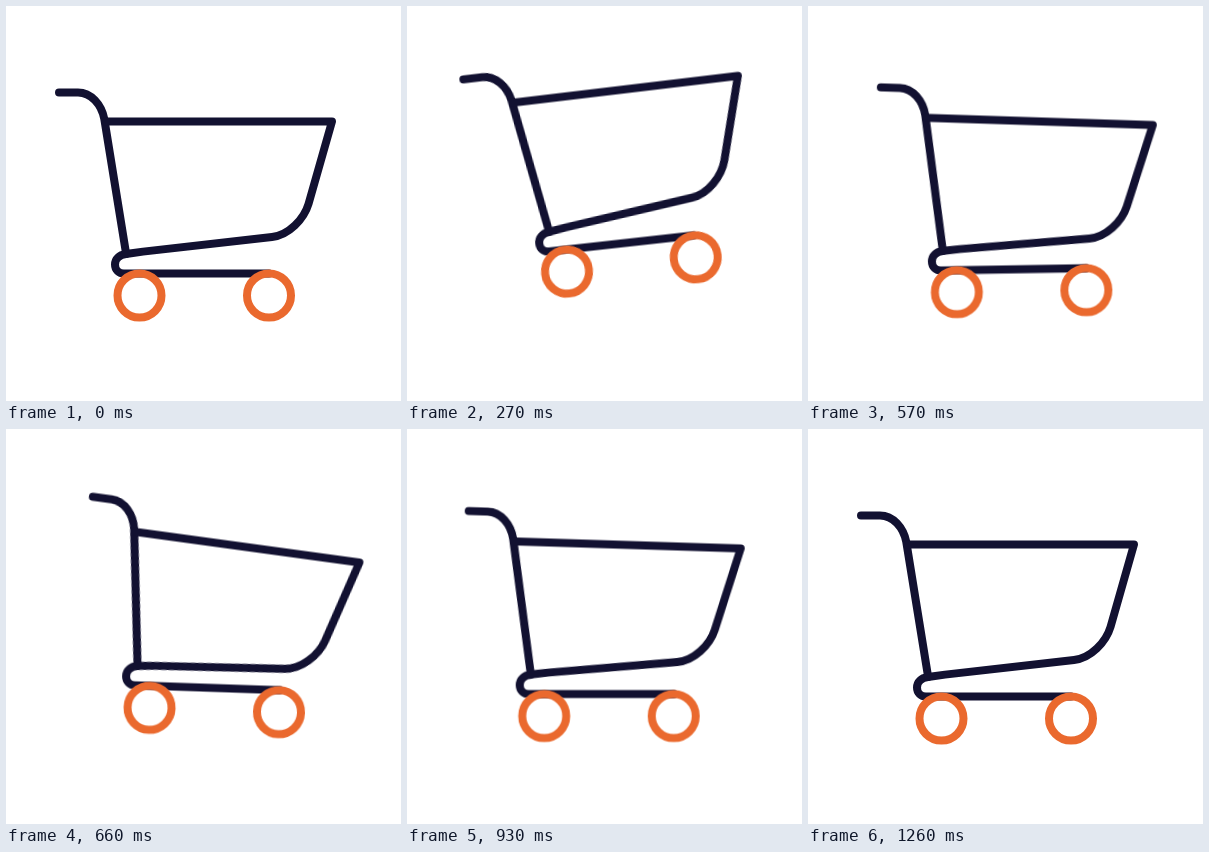
An HTML page without scripts that plays this animation: 395x395 px, repeating every 1.29 s.

```html
<!DOCTYPE html>
<html lang="en">
<head>
<meta charset="utf-8">
<title>Hopping cart</title>
<style>
  html, body { margin: 0; width: 100%; height: 100%; overflow: hidden; background: #fff; }
  svg { display: block; width: 100vw; height: 100vh; }

  g { animation: 1290ms infinite cubic-bezier(.364, 0, .636, 1); }
  path, circle { fill: none; stroke-width: 8; stroke-linecap: round; stroke-linejoin: round; }
  path { stroke: #121131; }
  circle { stroke: #ea692e; }

  .slide { animation-name: slide; }
  .hop { animation-name: hop; }
  .tilt { animation-name: tilt; transform-origin: 198.25px 289.5px; }
  .basket { animation-name: sway; transform-origin: 120px 247px; }

  /* Falls accelerate quadratically, rebounds decelerate like a sine. */
  @keyframes slide {
    0% { transform: translateX(0); }
    27.9% { transform: translateX(30.5px); animation-timing-function: cubic-bezier(.333, 0, .667, .333); }
    45.35% { transform: translateX(13.3px); animation-timing-function: cubic-bezier(.333, .53, .64, 1); }
    72.1% { transform: translateX(3.75px); animation-timing-function: cubic-bezier(.333, .53, .64, 1); }
    90%, 100% { transform: translateX(0); }
  }
  @keyframes hop {
    0% { transform: translateY(0); }
    27.7% { transform: translateY(-36px); animation-timing-function: cubic-bezier(.333, 0, .667, .333); }
    45.35% { transform: translateY(0); animation-timing-function: cubic-bezier(.333, .53, .64, 1); }
    58.3% { transform: translateY(-12.9px); }
    72.1% { transform: translateY(-2.5px); }
    96%, 100% { transform: translateY(0); }
  }
  @keyframes tilt {
    0% { transform: rotate(0deg); }
    27.9% { transform: rotate(-7.4deg); animation-timing-function: cubic-bezier(.333, 0, .667, .333); }
    45.35% { transform: rotate(0deg); animation-timing-function: cubic-bezier(.333, .53, .64, 1); }
    58.1% { transform: rotate(2.9deg); }
    72.1%, 100% { transform: rotate(0deg); }
  }
  @keyframes sway {
    0% { transform: rotate(0deg); }
    10.1% { transform: rotate(6deg); }
    30.2% { transform: rotate(-5.4deg); }
    37.2% { transform: rotate(-6.3deg); }
    48.8% { transform: rotate(7.2deg); animation-timing-function: cubic-bezier(.37, 0, .75, .75); }
    58.1% { transform: rotate(-5.1deg); animation-timing-function: cubic-bezier(.333, .53, .64, 1); }
    62% { transform: rotate(-6.6deg); }
    72.5% { transform: rotate(1.8deg); }
    84%, 100% { transform: rotate(0deg); }
  }
</style>
</head>
<body>
<svg viewBox="0 0 395 395">
  <g class="slide"><g class="hop"><g class="tilt">
    <path d="M120 248C113 249 109 253 109 258.5C109 264 113 267.5 118 267.5H263"/>
    <g class="basket">
      <path d="M53 86.5H72C85 86.5 95.5 98.5 98.3 113L120 247"/>
      <path d="M99 115.5H326L302.5 198C298 213 283 229 266 231L137 245.6L120 248"/>
    </g>
    <circle cx="133.5" cy="289.5" r="22"/>
    <circle cx="263" cy="289.5" r="22"/>
  </g></g></g>
</svg>
</body>
</html>
```
